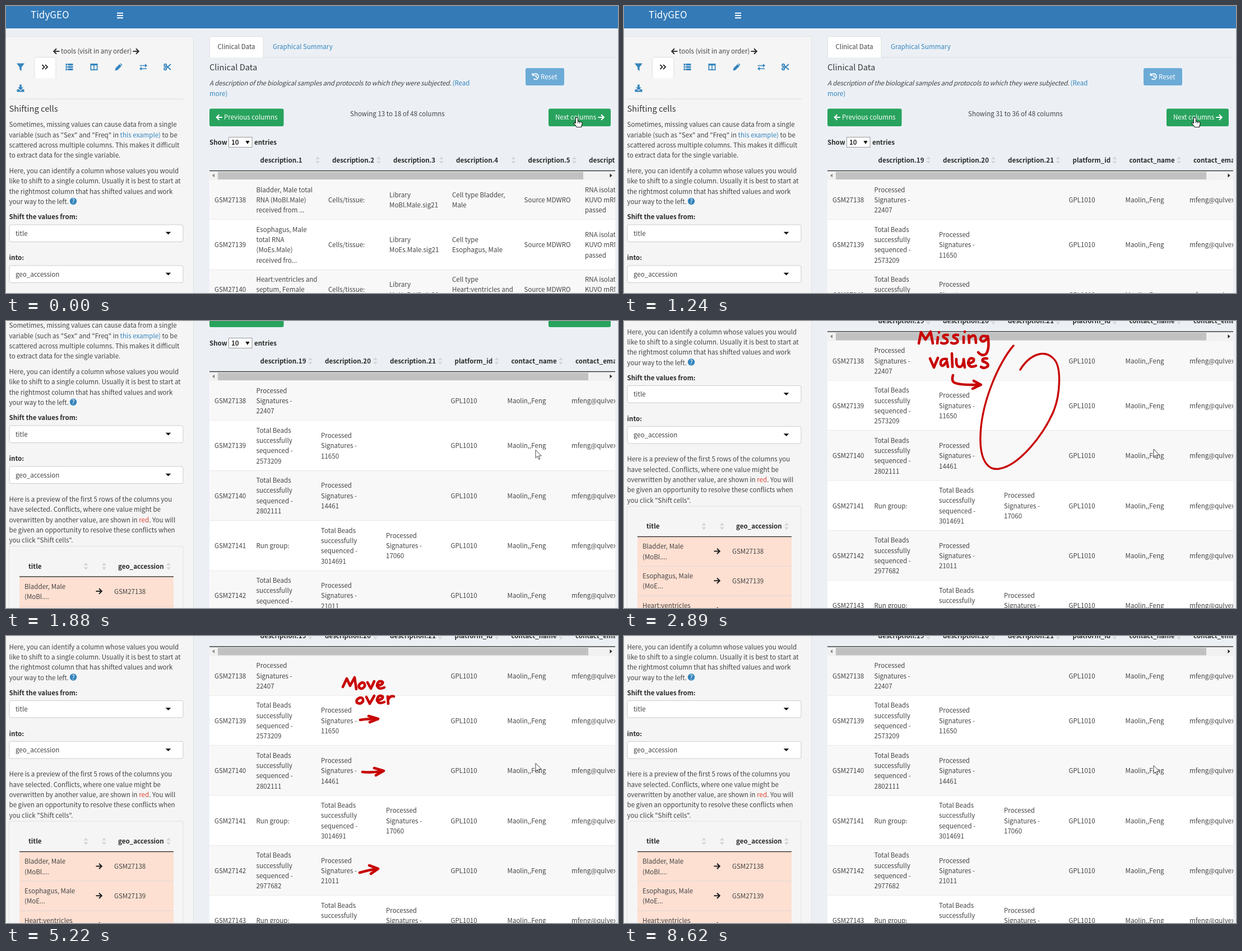
An HTML page for the animation above (9170 ms loop, 1092x513 px).

```html
<!DOCTYPE html>
<html lang="en">
<head>
<meta charset="utf-8">
<title>TidyGEO</title>
<style>
html, body { margin: 0; width: 100%; height: 100%; overflow: hidden; background: #ecf0f5; }
svg { display: block; width: 1092px; height: 513px; }
text { font: 11.55px "Noto Sans CJK JP", "Noto Sans CJK SC", "Noto Sans CJK KR", "Noto Sans CJK TC", "Noto Sans CJK", Lato, sans-serif; fill: #444; white-space: pre; }
.b { font-weight: 700; fill: #2b2b2b; }
.h { font-size: 14.7px; fill: #3a3a3a; }
.i { font-style: italic; letter-spacing: -.18px; }
.w { fill: #fff; }
.a { fill: #3585bd; }
.brand { font-size: 17px; font-weight: 500; fill: #fff; }
.ink { fill: none; stroke: #c80404; stroke-width: 4.6; stroke-linecap: round; stroke-linejoin: round; }
.thin { stroke-width: 3.4; }
.off { display: none; }
</style>
</head>
<body>
<svg id="stage" viewBox="0 0 1092 513" xmlns="http://www.w3.org/2000/svg"></svg>
<script>
const LOOP = 9170;
const BLUE = '#3585bd', GREEN = '#28a35d', DARK = '#333', LINE = 18.35;

// --- drawing helpers: text is placed by the middle of its capitals ---
const text = (x, y, s, cls = '', extra = '') =>
  `<text x="${x}" y="${y + 4.2}" class="${cls}" ${extra}>${s}</text>`;
const lines = (x, y, list, cls) => list.map((s, i) => text(x, y + i * LINE, s, cls)).join('');
const cell = (x, mid, s) => {
  const list = s.split('|');
  return lines(x, mid - (list.length - 1) * LINE / 2, list);
};
const rect = (x, y, w, h, fill, stroke = 'none', r = 0) =>
  `<rect x="${x}" y="${y}" width="${w}" height="${h}" rx="${r}" fill="${fill}" stroke="${stroke}"/>`;
const shape = (x, y, d, fill = BLUE) => `<path transform="translate(${x} ${y})" d="${d}" fill="${fill}" fill-rule="evenodd"/>`;
const line = (x, y, d, color = BLUE, w = 2) =>
  `<path transform="translate(${x} ${y})" d="${d}" fill="none" stroke="${color}" stroke-width="${w}"/>`;
const rule = (x1, x2, y, color = '#ddd', w = 1) => rect(x1, y - w / 2, x2 - x1, w, color);
const right = (x, y, c) => line(x, y, 'M-5.5 0H4.5M0 -4.8L4.8 0L0 4.8', c, 2.1);
const left = (x, y, c) => line(x, y, 'M5.5 0H-4.5M0 -4.8L-4.8 0L0 4.8', c, 2.1);
const sorter = (x, y) => shape(x, y, 'M-4 -1.5L0 -6.5L4 -1.5ZM-4 1.5L0 6.5L4 1.5Z', '#d6d6d6');
const group = (id, body, extra = '') => `<g id="${id}" ${extra}>${body}</g>`;

// --- left panel ---
function picker(y, w, label) {
  return rect(6, y - 15.5, w, 30.5, '#fff', '#ccc', 3) + text(17, y, label) +
    shape(w - 20.5, y - 2.8, 'M-4.8 0H4.8L0 4.8Z', '#111');
}

function tools(s) {
  return left(90 - s / 2, 81, DARK) + text(98 - s / 2, 81, 'tools (visit in any order)') + right(232 - s / 2, 81, DARK) +
    '<path d="M50.5 129V94.5q0 -3 3 -3H86q3 0 3 3V129" fill="#fff" stroke="#ddd"/>' +
    shape(26, 109, 'M-7 -6.5H7L1.7 .5V7L-1.7 4.5V.5Z') +
    line(69.5, 109, 'M-5 -4L-1 0L-5 4M.5 -4L4.5 0L.5 4', DARK) +
    shape(113, 109, 'M-6.5 -6h3v3.2h-3zM-2.5 -6h9v3.2h-9zM-6.5 -1.6h3v3.2h-3zM-2.5 -1.6h9v3.2h-9zM-6.5 2.8h3V6h-3zM-2.5 2.8h9V6h-9z') +
    shape(157, 109, 'M-6.5 -6h13V6h-13zM-4.8 -2.7h4V4.3h-4zM.8 -2.7h4V4.3h-4z') +
    shape(201, 109, 'M-6.5 6.5L-5.5 2L1.5 -5L5 -1.5L-2 5.5ZM2.3 -5.8L3.6 -6.6L6.6 -3.6L5.8 -2.3Z') +
    line(245, 109, 'M-6.5 -2.5H4M6 3H-4', BLUE, 1.7) + shape(245, 109, 'M3 -6L7 -2.5L3 1ZM-3 -.5L-7 3L-3 6.5Z') +
    line(288, 109, 'M-2 -2.2L6 5M-2 2.2L6 -5M-1.7 -3.2A2.1 2.1 0 1 0 -5.9 -3.2A2.1 2.1 0 1 0 -1.7 -3.2M-1.7 3.2A2.1 2.1 0 1 0 -5.9 3.2A2.1 2.1 0 1 0 -1.7 3.2', BLUE, 1.9) +
    shape(26, 147, 'M-1.8 -6.5H1.8V-1.5H5L0 3.5L-5 -1.5H-1.8ZM-6.5 2H-3L0 5L3 2H6.5V6.5H-6.5Z') +
    rule(5, 317 - s, 166);
}

function preview() {
  const rows = [['Bladder, Male', '(MoBl....'], ['Esophagus, Male', '(MoE...'], ['Heart:ventricles', 'and septum...']];
  return rect(5.5, 606.5, 310.5, 300, '#f5f5f5', '#e0e0e0', 3) +
    text(40, 642.5, 'title', 'b') + text(200, 642.5, 'geo_accession', 'b') +
    [142.5, 175, 290].map(x => sorter(x, 642.5)).join('') +
    rect(24, 661, 275, 160, '#fee0d2') +
    rows.map((r, i) => {
      const y = 678.5 + i * 52.8;
      return lines(33, y, r) + right(166, y + 8.5, '#222') + text(193, y + 9, 'GSM' + (27138 + i)) + rule(24, 299, y + 35.2, '#dfd8d4');
    }).join('') +
    rule(24, 299, 661, '#222', 1.3);
}

function sidebar(s) {
  return rect(-10, 54.5, 344.5 - s, 900, '#f5f5f5', '#e0e0e0') + tools(s) +
    text(5.5, 185, 'Shifting cells', 'h') +
    lines(5.5, 212, [
      'Sometimes, missing values can cause data from a single',
      'variable (such as "Sex" and "Freq" in <tspan class="a">this example)</tspan> to be',
      'scattered across multiple columns. This makes it difficult',
      'to extract data for the single variable.']) +
    lines(5.5, 294.8, [
      'Here, you can identify a column whose values you would',
      'like to shift to a single column. Usually it is best to start at',
      'the rightmost column that has shifted values and work',
      'your way to the left.']) +
    `<circle cx="120" cy="349" r="6.2" fill="${BLUE}"/>` +
    text(120, 349, '?', 'w', 'text-anchor="middle" font-weight="700"') +
    text(5.5, 377, 'Shift the values from:', 'b') + picker(406.5, 310 - s, 'title') +
    text(5.5, 450, 'into:', 'b') + picker(479.5, 310 - s, 'geo_accession') +
    lines(5.5, 522.7, [
      'Here is a preview of the first 5 rows of the columns you',
      'have selected. Conflicts, where one value might be',
      'overwritten by another value, are shown in <tspan fill="#dd4433">red</tspan>. You will',
      'be given an opportunity to resolve these conflicts when',
      'you click "Shift cells".']) +
    preview();
}

// --- right side; s is how much narrower the page is ---
function main(s) {
  const x = 363 - s, reset = 927 - s * 2.5, next = 968 - s * 3;
  return rule(x, 1087 - s * 3, 92) +
    `<path d="M${x + .5} 92.5V57.5q0 -3 3 -3H${x + 93}q3 0 3 3V92.5" fill="#fff" stroke="#ddd"/>` +
    text(x + 14.5, 73, 'Clinical Data') + text(x + 113, 73, 'Graphical Summary', 'a') +
    text(x, 111, 'Clinical Data', 'h') +
    text(x, 138, 'A description of the biological samples and protocols to which they were subjected.', 'i') +
    text(x + 433.5, 138, '(Read', 'a') + text(x, 156.5, 'more)', 'a') +
    rect(reset, 111, 69, 31, '#6cabd6', 'none', 3) +
    line(reset + 18, 126, 'M-4.6 -2.5A5.2 5.2 0 1 1 -3.5 4M-5.5 -6V-2H-1.5M.5 -3V.5L3 2', '#fff', 1.7) +
    text(reset + 27, 126.3, 'Reset', 'w') +
    rect(x, 183.5, 132.5, 31.5, GREEN, 'none', 3) + left(x + 17.5, 199, '#fff') + text(x + 26, 199, 'Previous columns', 'w') +
    text(614 - s * 1.8, 193, '', 'count') +
    `<rect class="next" x="${next}" y="183.5" width="111" height="31.5" rx="3" fill="${GREEN}"/>` +
    text(next + 12, 199, 'Next columns', 'w') + right(next + 94, 199, '#fff');
}

const header = rect(0, 0, 1092, 40, '#337ab7') + text(44, 17.6, 'TidyGEO', 'brand') +
  line(203.5, 17, 'M-5.5 -4.2H5.5M-5.5 0H5.5M-5.5 4.2H5.5', '#fff', 1.9);
const layout = s => header + sidebar(s) + main(s);

// --- data tables ---
const beads = n => 'Total Beads|successfully|sequenced -|' + n;
const signs = n => 'Processed|Signatures -|' + n;
const numbered = from => Array.from({ length: 6 }, (_, i) => 'description.' + (from + i));
const EVEN = [446.5, 562, 678, 793.5, 909, 1024.5];
const contact = ['GPL1010', 'Maolin,,Feng', 'mfeng@qulvex'];
const sample = (about, id, type) =>
  [about, 'Cells/tissue:', `Library|${id}.sig21`, 'Cell type ' + type, 'Source MDWRO', 'RNA isolation|KUVO mRNA|passed'];
const brief = ['Run group:', 'Cells/tissue:', 'Source MDWRO', '', '', ''];

const TABLES = [
  { from: 13, heads: numbered(1), xs: [446.5, 575, 684, 796, 924.5, 1033], thumb: 1030, rows: [
    sample('Bladder, Male total|RNA (MoBl.Male)|received from ...', 'MoBl.Male', 'Bladder,|Male'),
    sample('Esophagus, Male|total RNA|(MoEs.Male)|received fro...', 'MoEs.Male', '|Esophagus, Male'),
    sample('Heart:ventricles and|septum, Female|total RNA (...', 'MoHeFeVS', '|Heart:ventricles and|septum, Female')] },
  { from: 19, heads: numbered(7), xs: EVEN, thumb: 1030, rows: [brief, brief, brief, brief, brief] },
  { from: 25, heads: numbered(13), xs: EVEN, thumb: 1030, rows: [brief, brief, brief, brief, brief] },
  { from: 31, heads: [...numbered(19).slice(0, 3), 'platform_id', 'contact_name', 'contact_email'],
    xs: [446.5, 562, 678, 793.5, 894.5, 1009], thumb: 1039, rows: [
    [signs(22407), '', ''],
    [beads(2573209), signs(11650), ''],
    [beads(2802111), signs(14461), ''],
    ['Run group:', beads(3014691), signs(17060)],
    [beads(2977682), signs(21011), ''],
    ['Run group:', beads(3011542), signs(17388)]].map(r => [...r, ...contact]) }
];

const frame = text(363, 243.5, 'Show', 'b') + rect(397.5, 234.5, 41.5, 18, '#fff', '#999') +
  text(402, 243.5, '10', 'b') + shape(431, 241, 'M-3.6 0H3.6L0 6Z', '#111') + text(443, 243.5, 'entries', 'b');

function table(t, n) {
  let top = 311;
  const body = t.rows.map((row, i) => {
    const h = Math.max(...row.map(s => s.split('|').length)) * LINE + 16, mid = top + h / 2 + .3;
    const out = rect(363, top, 724, h, i % 2 ? '#fff' : '#f8f8f8') + rule(363, 1087, top + h, '#d9d9d9') +
      text(372, mid, 'GSM' + (27138 + i)) + row.map((s, k) => s && cell(t.xs[k], mid, s)).join('');
    top += h;
    return out;
  }).join('');
  const heads = t.heads.map((s, k) => text(t.xs[k] + 7, 275.5, s, 'b') + (k < 5 ? sorter(t.xs[k + 1] - 19, 275.5) : '')).join('');
  const bar = rect(363, 295, 724, 16, '#f1f1f1') + rect(378, 296.5, t.thumb - 378, 13.5, '#c1c1c1') +
    shape(370, 303, 'M2 -3.5L-2 0L2 3.5Z', '#888') + shape(1079.5, 303, 'M-2 -3.5L2 0L-2 3.5Z', '#222') +
    rule(363, 1087, 294.5, '#222', 1.3);
  return group('table' + n, frame + heads + body + bar, 'clip-path="url(#edge)"');
}

const dots = Array.from({ length: 8 }, (_, i) => {
  const a = i * Math.PI / 4;
  return `<circle class="dot" cx="${714.3 + 44.5 * Math.sin(a)}" cy="${416.2 - 44.5 * Math.cos(a)}" r="9.2"/>`;
}).join('');

// --- handwriting ---
const missing = `M526 40L530 20L538 33L547 19L551 40M560 29L559 40M562 20v.5
  M578 25Q568 24 570 29Q579 33 577 38Q572 42 566 39M596 25Q586 24 588 29Q597 33 595 38Q590 42 584 39
  M606 28L606 39M608 19v.5M615 26L616 39M616 31Q624 22 627 29L628 39
  M647 28Q637 24 636 33Q640 41 648 31L649 27Q653 49 646 59Q639 64 632 56`;
const values = `M546 67L553 83L560 66M576 68Q564 66 565 77Q568 85 576 72L578 82M585 58L586 82
  M593 68Q592 83 600 82Q606 80 606 68L608 83M614 76Q626 74 624 68Q616 63 614 75Q616 85 628 80
  M648 67Q638 66 640 72Q652 76 649 81Q643 86 637 82
  M587 97Q584 107 589 110Q600 115 636 114M624 107L637 114L622 121`;
const ring = `M695 44C670 72 634 150 636 216C637 250 650 268 670 264C705 258 748 205 767 160
  C778 132 781 84 768 69C752 50 725 58 707 87`;
const over = `M601 91L608 76L614 89L622 74L625 95M636 83Q628 86 630 92Q635 97 640 90Q641 83 635 83
  M645 83L651 94L657 81M662 89Q674 87 672 82Q664 78 662 88Q664 97 675 92
  M632 110Q624 113 626 119Q632 123 637 117Q638 110 632 110M643 109L649 121L657 107
  M662 115Q674 113 672 108Q664 104 662 114Q664 123 675 118M681 108L682 121M682 114Q685 106 692 108
  M632 150Q648 147 663 149M647 143L664 148L649 154
  M636 243Q655 245 673 241M657 236L674 241L660 249
  M631 423Q648 418 663 416M648 410L664 416L651 425`;
const ink = (d, cls = '') => `<path class="ink ${cls}" d="${d}"/>`;

const stage = document.getElementById('stage');
stage.innerHTML = '<clipPath id="edge"><rect x="363" y="0" width="724" height="1000"/></clipPath>' +
  rect(0, 0, 1092, 513, '#ecf0f5') +
  group('page',
    group('wide', layout(0) + TABLES.map(table).join('')) +
    group('narrow', layout(5) + dots + rect(1086.5, 0, 6, 513, '#f1f1f1') + rect(1087, 9, 5, 504, '#c4c4c4'))) +
  group('missing', ink(missing) + ink(values) + ink(ring, 'thin')) +
  group('over', ink(over)) +
  group('hand', '<path d="M-2 1.2Q0 -1.8 2 1.2V6.5L8 8Q10 8.8 9.6 11L8 17H0L-5.2 10.5Q-5.2 7.5 -2 9.8Z" fill="#fff" stroke="#222" stroke-width="1.2"/><path d="M2 6.5V10M5 7.3V10.5" stroke="#222"/>') +
  group('arrow', '<path d="M.5 .5V15L3.8 11.8L6.2 17.4L8.4 16.4L6 11H10.8Z" fill="#fff" stroke="#444"/>');

// --- timeline: each entry holds until the next one ---
const NONE = -1;
const VIEW = [ // time, table, leading dot, pressed
  [0, 0, NONE, 0], [80, 0, NONE, 1], [230, 0, 4, 0], [320, 1, NONE, 0], [500, 1, NONE, 1],
  [670, 1, 5, 0], [740, 1, 6, 0], [830, 2, NONE, 0], [920, 2, NONE, 1], [1090, 2, 5, 0],
  [1160, 2, 6, 0], [1240, 3, NONE, 0]];
const SCROLL = [[0, 0], [1480, 46], [1560, 105], [1650, 160], [1720, 183.5], [1880, 204], [1960, 250], [2040, 275.5]];
const POINTER = [[0, 1018.5, 199.5], [1320, 992, 214], [1400, 962, 226], [1480, 946, 231], [1880, 944.5, 230],
  [2890, 944.5, 228.5], [2960, 944.5, 227], [8160, 944.5, 229], [8240, 944.5, 231]];
const NOTE = [[0, ''], [2430, 'missing'], [3270, ''], [5220, 'over', 0], [6060, ''], [7760, 'over', -116], [8540, '']];

const at = (list, t) => list.filter(e => e[0] <= t).pop();
const el = id => document.getElementById(id);
const show = (id, on) => el(id).classList.toggle('off', !on);
const move = (id, x, y) => el(id).setAttribute('transform', `translate(${x} ${y})`);
const all = (sel, fn) => stage.querySelectorAll(sel).forEach(fn);
const GLOW = ['#0b79dc', '#4296e0', '#76b0e2'];

function draw(now) {
  const t = now % LOOP;
  const [, page, lead, pressed] = at(VIEW, t), from = TABLES[page].from;
  const [, x, y] = at(POINTER, t), [, note, dx = 0] = at(NOTE, t);
  show('wide', lead === NONE);
  show('narrow', lead !== NONE);
  TABLES.forEach((_, i) => show('table' + i, i === page));
  all('.count', e => e.textContent = `Showing ${from} to ${from + 5} of 48 columns`);
  all('.next', e => e.setAttribute('fill', pressed ? '#218c4e' : GREEN));
  all('.dot', (e, i) => e.setAttribute('fill', GLOW[(lead - i + 8) % 8] || '#bcd6ee'));
  move('page', 0, -at(SCROLL, t)[1]);
  show('missing', note === 'missing');
  show('over', note === 'over');
  move('over', dx, 0);
  show('hand', t < 1320);
  show('arrow', t >= 1320);
  move('hand', x, y);
  move('arrow', x, y);
}

const start = performance.now();
function tick() {
  draw(performance.now() - start);
  requestAnimationFrame(tick);
}
draw(0);
requestAnimationFrame(tick);
</script>
</body>
</html>
```
